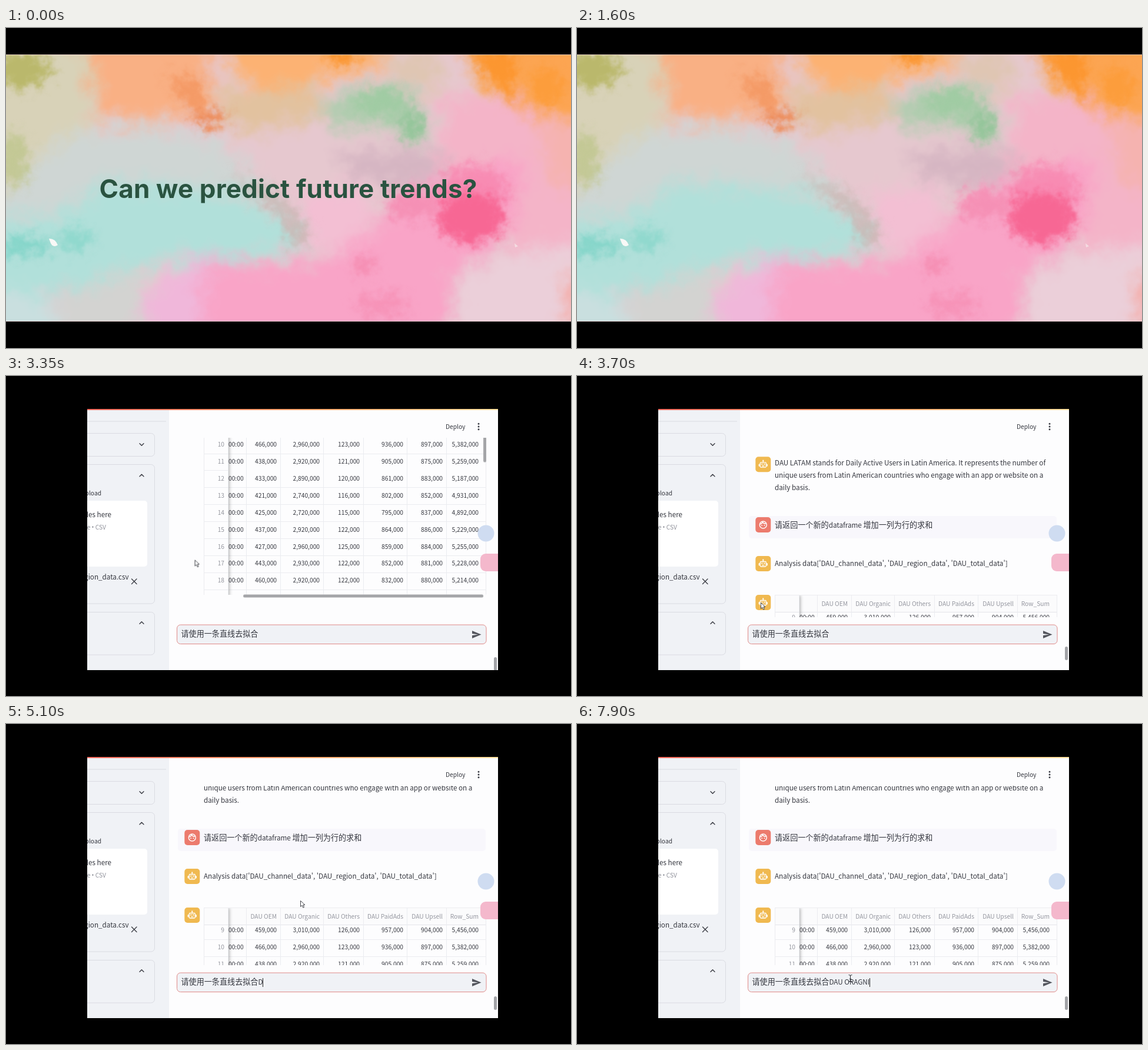
An HTML page without scripts for the animation above (8000 ms loop, 960 by 544 pixels).

```html
<!DOCTYPE html>
<html lang="zh-CN">
<head>
<meta charset="utf-8">
<title>Trend chat demo</title>
<style>
html, body { margin: 0; width: 100%; height: 100%; overflow: hidden; background: #000; }
.stage { position: relative; width: 960px; height: 544px; overflow: hidden; background: #000;
  font: 11.68px "Noto Sans CJK SC", "Noto Sans CJK", "Noto Sans", sans-serif; color: #34363e; }
.stage svg, .stage div { position: absolute; }
.stage svg { left: 0; top: 0; }
text { fill: #34363e; white-space: pre; }
.sm { font-size: 10.24px; }
.cn { font-size: 13.1px; }
.end { text-anchor: end; }
.line { fill: none; stroke: #dadbe2; }
.icon { fill: none; stroke: #3c3e46; stroke-width: 1.4; stroke-linecap: round; stroke-linejoin: round; }
.dots { stroke-width: 3; }

/* every state change is a hard cut on one 8 s clock */
.paint, .title, .screen, .chat, .bars, .thumb, .ime, .shade, .arrow, .beam, .caret, .cjk::after, .lat::after {
  animation: 8s step-end infinite; }
.paint { animation-name: paint; }
.title { animation-name: title; font: 700 44px Inter, sans-serif; letter-spacing: .15px; fill: #2a5340; text-anchor: middle; }
.screen { animation-name: screen; width: 960px; height: 544px; clip-path: inset(56px 124px 44px 138px); background: #fdfdfe; }
.view { left: 278px; top: 105px; width: 557px; height: 305px; overflow: hidden; }
.chat { animation-name: scroll; left: -278px; top: -105px; width: 960px; height: 700px; }
.bars { animation-name: bars; }
.thumb { animation-name: thumb; }
.ime { animation-name: ime; }
.shade { animation-name: shade; }
.arrow { animation-name: arrow; }
.beam { animation-name: beam; }

.table { left: 336px; top: 312px; width: 480px; height: 323px; overflow: hidden; display: flex;
  border-top: 1px solid #ececf0; box-sizing: border-box; font-size: 10.24px;
  background: repeating-linear-gradient(#0000 0 27.875px, #ebecf0 27.875px 28.875px) 0 -3.5px / 100% 400px; }
.stage .col { position: relative; flex: none; width: var(--w); height: 330px; box-sizing: border-box; padding-right: 6px;
  border-right: 1px solid #ebecf0; white-space: pre; text-align: right; line-height: 28.875px; }
.col b { display: block; position: relative; height: 28.5px; line-height: 27.5px; margin: 0 -6px -5.1px 0; padding-right: 6px;
  box-sizing: border-box; background: #fbfbfc; border-bottom: 1px solid #e4e5ea; color: #94969f; font-weight: 400; }
.stage .idx { z-index: 2; color: #92949c; border-left: 1px solid #ebecf0; background: inherit; background-color: #fdfdfe;
  background-position: 0 -3.5px; box-shadow: 2px 0 5px #0004; }
.col:last-child, .col:last-child b { padding-right: 12px; }
.col:last-child b { margin-right: -12px; }

.input { left: 297.5px; top: 428.4px; height: 20px; display: flex; align-items: baseline; white-space: pre; line-height: 20px; }
.cjk { font-size: 13.1px; }
.cjk::after { content: ""; animation-name: cjk; }
.lat::after { content: ""; animation-name: lat; }
.caret { align-self: center; width: 1px; height: 15px; margin-top: 2px; background: #222; animation-name: caret; }

@keyframes paint { 0% { opacity: 1 } 28.75%, to { opacity: 0 } }
@keyframes title { 0% { opacity: 1 } 20%, to { opacity: 0 } }
@keyframes screen { 0% { opacity: 0 } 28.75%, to { opacity: 1 } }
@keyframes scroll {
  0% { transform: translateY(-263.5px) }
  46.25% { transform: translateY(60px) }
  55% { transform: translateY(42px) }
  59.375%, to { transform: none }
}
@keyframes bars { 0% { opacity: 0 } 41.875% { opacity: 1 } 46.25%, to { opacity: 0 } }
@keyframes thumb {
  0% { opacity: 0; transform: translateY(15px) }
  37.5% { opacity: 1; transform: translateY(15px) }
  46.25% { opacity: 1; transform: translateY(-3px) }
  55% { opacity: 1; transform: translateY(-2px) }
  59.375%, to { opacity: 1; transform: none }
}
@keyframes ime { 0% { opacity: 1 } 33.125%, to { opacity: 0 } }
@keyframes shade { 0% { opacity: 1 } 37.5%, to { opacity: 0 } }
@keyframes arrow {
  0% { opacity: 1; transform: translate(393px, 443px) }
  37.5% { transform: translate(400px, 420px) }
  41.875% { transform: translate(320.5px, 312.5px) }
  46.25% { transform: translate(312px, 385px) }
  50.625% { transform: translate(470px, 309px) }
  55% { transform: translate(472px, 340px) }
  63.75% { transform: translate(500px, 300px) }
  68.125% { opacity: 1; transform: translate(462px, 320px) }
  76.875%, to { opacity: 0; transform: translate(462px, 320px) }
}
@keyframes beam { 0% { opacity: 0 } 76.875%, to { opacity: 1 } }
@keyframes caret { 0% { opacity: 1 } 37.5% { opacity: 0 } 55%, to { opacity: 1 } }
@keyframes cjk { 0% { content: "" } 33.125% { content: "去" } 37.5%, to { content: "去拟合" } }
@keyframes lat {
  0% { content: "qu" }
  33.125% { content: "" }
  63.75% { content: "D" }
  68.125% { content: "DA" }
  72.5% { content: "DAU" }
  76.875% { content: "DAUOR" }
  81.25% { content: "DAU" }
  85.625% { content: "DAU O" }
  90% { content: "DAU ORAG" }
  98.75%, to { content: "DAU ORAGNI" }
}
</style>
</head>
<body>
<div class="stage">

<svg class="paint" width="960" height="544">
  <defs>
    <filter id="wash" filterUnits="userSpaceOnUse" x="-60" y="-20" width="1080" height="600" color-interpolation-filters="sRGB">
      <feGaussianBlur in="SourceGraphic" stdDeviation="15" result="soft"/>
      <feTurbulence type="fractalNoise" baseFrequency=".035" numOctaves="4" seed="4" result="noise"/>
      <feDisplacementMap in="soft" in2="noise" scale="40" xChannelSelector="R" yChannelSelector="G"/>
    </filter>
    <filter id="spots" filterUnits="userSpaceOnUse" x="-60" y="-20" width="1080" height="600" color-interpolation-filters="sRGB">
      <feGaussianBlur in="SourceGraphic" stdDeviation="9" result="soft"/>
      <feTurbulence type="fractalNoise" baseFrequency=".06" numOctaves="3" seed="9" result="noise"/>
      <feDisplacementMap in="soft" in2="noise" scale="38" xChannelSelector="R" yChannelSelector="G"/>
    </filter>
    <clipPath id="band"><path d="M0 45H960V499H0Z"/></clipPath>
  </defs>
  <g clip-path="url(#band)">
    <path fill="#e6c8cf" d="M0 45H960V499H0Z"/>
    <g filter="url(#wash)">
      <path fill="#e6c8cf" d="M-60 -20H1020V580H-60Z"/>
      <path fill="#d8d2b8" d="M-60 -20H140L150 180L40 330H-60Z"/>
      <path fill="#cfd6d4" d="M100 180L240 165L360 190L430 260L500 360L400 400L-60 420V330Z"/>
      <path fill="#b1e0da" d="M-60 335L110 310L160 262L300 270L400 285L480 325L510 375L400 392L300 385L190 430L60 455H-60Z"/>
      <path fill="#c9dfdf" d="M-60 440L70 455L110 560H-60Z"/>
      <path fill="#d3d3d1" d="M80 460L240 400L220 560H110Z"/>
      <path fill="#f9b084" d="M125 -20H345L350 130L280 155L160 155Z"/>
      <path fill="#fcb273" d="M350 -20H640V70L540 88L450 110L390 85Z"/>
      <path fill="#e2c29f" d="M350 105L450 105L530 95L540 150L420 178L370 165Z"/>
      <path fill="#dfc6b2" d="M640 40H740L735 120L660 90Z"/>
      <path fill="#aecdae" d="M530 135L590 105L670 98L715 150L700 190L640 165L560 168Z"/>
      <path fill="#d5b5c2" d="M560 215L720 200L760 240L700 270L590 260Z"/>
      <path fill="#f4b4c8" d="M740 110L1020 130V380H860L740 240Z"/>
      <path fill="#f5b3b0" d="M900 150H1020V290L930 270Z"/>
      <path fill="#fca552" d="M775 -20H1020V150L920 150L865 120L800 95Z"/>
      <path fill="#f3bfd3" d="M490 285L600 265L630 320L590 385L520 370Z"/>
      <path fill="#f0b7da" d="M225 580L240 450L320 390L400 400V580Z"/>
      <path fill="#f9a4c7" d="M330 580L335 405L480 400L560 385L620 345L680 280L760 250L880 215L870 320L820 385L760 420L750 580Z"/>
      <path fill="#ebcfd9" d="M770 420L860 380L1020 360V580H760Z"/>
      <path fill="#f3b2b0" d="M948 420H1020V580H948Z"/>
    </g>
    <g filter="url(#spots)">
      <ellipse cx="25" cy="70" rx="50" ry="32" fill="#b5b45f" opacity=".85"/>
      <ellipse cx="14" cy="225" rx="24" ry="48" fill="#bfc68c" opacity=".8"/>
      <path fill="#f49a66" d="M270 80L330 85L345 150L300 130Z"/>
      <ellipse cx="348" cy="154" rx="29" ry="13" fill="#ee8852"/>
      <ellipse cx="570" cy="48" rx="26" ry="13" fill="#fb9227"/>
      <ellipse cx="690" cy="165" rx="18" ry="30" fill="#94c59a"/>
      <ellipse cx="635" cy="125" rx="45" ry="22" fill="#a0cba3"/>
      <path fill="#fc9630" d="M785 40H865L862 130L835 100Z"/>
      <ellipse cx="918" cy="100" rx="28" ry="34" fill="#fc9d3c"/>
      <path fill="#c9b5b1" d="M375 245L460 280L520 345L490 380L465 320Z" opacity=".75"/>
      <ellipse cx="30" cy="370" rx="48" ry="16" fill="#84d5c9"/>
      <ellipse cx="118" cy="360" rx="30" ry="18" fill="#8fd8cd"/>
      <ellipse cx="690" cy="300" rx="42" ry="26" fill="#f590b5"/>
      <ellipse cx="795" cy="275" rx="60" ry="42" fill="#f783ad" opacity=".75"/>
      <ellipse cx="790" cy="322" rx="58" ry="44" fill="#f76794"/>
      <ellipse cx="608" cy="405" rx="20" ry="16" fill="#f58db2"/>
      <ellipse cx="640" cy="470" rx="45" ry="20" fill="#f68eb3" opacity=".75"/>
    </g>
    <path fill="#f8f8f6" d="M73 358Q84 358 88 369Q80 374 76 366Z"/>
    <path fill="#f4dde2" d="M864 366L870 371L865 373Z"/>
    <path stroke="#f6d9d8" opacity=".7" d="M0 45.5H960M0 498.5H960"/>
  </g>
  <text class="title" x="479.5" y="288.5">Can we predict future trends?</text>
</svg>

<div class="screen">
  <svg width="960" height="544">
    <defs>
      <linearGradient id="top"><stop stop-color="#f4685c"/><stop offset=".55" stop-color="#fba96c"/><stop offset="1" stop-color="#fde3a0"/></linearGradient>
      <path id="down" class="icon" d="M-3.5 -1.8L0 1.8L3.5 -1.8"/>
      <path id="up" class="icon" d="M-3.5 1.8L0 -1.8L3.5 1.8"/>
    </defs>
    <path fill="#f0f2f6" d="M138 56H277V500H138Z"/>
    <path fill="url(#top)" d="M138 56H836V58H138Z"/>
    <g class="line">
      <path d="M138 77H272"/>
      <rect x="100" y="97.5" width="152.5" height="39" rx="6"/>
      <rect x="100" y="150.5" width="152.5" height="236.5" rx="6"/>
      <rect x="100" y="401.5" width="152.5" height="72.5" rx="6"/>
    </g>
    <rect x="100" y="212" width="140" height="112" rx="5" fill="#fff"/>
    <use href="#down" x="230.5" y="116.5"/>
    <use href="#up" x="230.5" y="169"/>
    <use href="#up" x="230.5" y="419.5"/>
    <path class="icon" d="M213.5 345l8.5 8.5m0 -8.5l-8.5 8.5"/>
    <g class="end">
      <text class="sm" x="162" y="203">Upload</text>
      <text x="179" y="240">Drop files here</text>
      <text class="sm" x="170" y="261" style="fill:#8f919a">per file <tspan font-family="Noto Sans, sans-serif">•</tspan> CSV</text>
      <text x="208.5" y="346">DAU_region_data.csv</text>
    </g>
    <text class="sm" x="747" y="90">Deploy</text>
    <path class="icon dots" d="M803 81.3h.01M803 86h.01M803 90.7h.01"/>
  </svg>

  <div class="view"><div class="chat">
    <svg width="960" height="700">
      <defs>
        <g id="bot">
          <rect width="26" height="26" rx="5" fill="#f0b950"/>
          <g fill="none" stroke="#fff" stroke-width="1.3">
            <rect x="8" y="9.5" width="10" height="8.5" rx="1.5"/>
            <path d="M13 9.5V6.5M8 13H6v2.5h2M18 13h2v2.5h-2M10.8 15.7h4.4"/>
          </g>
          <path fill="#fff" d="M10 11.5h2v2h-2zM14 11.5h2v2h-2zM12 5.5h2v2h-2z"/>
        </g>
      </defs>
      <rect x="292" y="178" width="523" height="38" rx="5" fill="#f8f7fc"/>
      <use href="#bot" x="303.3" y="77.3"/>
      <use href="#bot" x="303.3" y="246"/>
      <use href="#bot" x="303.3" y="312"/>
      <g transform="translate(303.3 180)">
        <rect width="26" height="26" rx="5" fill="#ec7b6d"/>
        <circle cx="13" cy="13" r="6" fill="none" stroke="#fff" stroke-width="1.4"/>
        <path fill="none" stroke="#fff" stroke-width="1.4" d="M7.5 12Q11 11.5 12 8.5Q14 11.5 18.5 11"/>
        <path fill="#fff" d="M10 13.3h1.6v1.6h-1.6zM14.4 13.3h1.6v1.6h-1.6z"/>
      </g>
      <text x="336" y="92">DAU LATAM stands for Daily Active Users in Latin America. It represents the number of</text>
      <text x="336" y="113">unique users from Latin American countries who engage with an app or website on a</text>
      <text x="336" y="134">daily basis.</text>
      <text class="cn" x="336" y="198">请返回一个新的<tspan font-size="11.68">dataframe </tspan>增加一列为行的求和</text>
      <text x="336" y="263">Analysis data['DAU_channel_data', 'DAU_region_data', 'DAU_total_data']</text>
    </svg>
    <div class="table">
      <div class="col idx" style="--w:42px"><b> </b>9
10
11
12
13
14
15
16
17
18</div>
      <div class="col" style="--w:31px"><b> </b>00:00
00:00
00:00
00:00
00:00
00:00
00:00
00:00
00:00
00:00</div>
      <div class="col" style="--w:58px"><b>DAU OEM</b>459,000
466,000
438,000
433,000
421,000
425,000
437,000
427,000
443,000
460,000</div>
      <div class="col" style="--w:73px"><b>DAU Organic</b>3,010,000
2,960,000
2,920,000
2,890,000
2,740,000
2,720,000
2,920,000
2,960,000
2,930,000
2,920,000</div>
      <div class="col" style="--w:68px"><b>DAU Others</b>126,000
123,000
121,000
120,000
116,000
115,000
122,000
125,000
122,000
122,000</div>
      <div class="col" style="--w:74px"><b>DAU PaidAds</b>957,000
936,000
905,000
861,000
802,000
795,000
864,000
859,000
852,000
832,000</div>
      <div class="col" style="--w:67px"><b>DAU Upsell</b>904,000
897,000
875,000
883,000
852,000
837,000
886,000
884,000
881,000
880,000</div>
      <div class="col" style="--w:67px"><b>Row_Sum</b>5,456,000
5,382,000
5,259,000
5,187,000
4,931,000
4,892,000
5,229,000
5,255,000
5,228,000
5,214,000</div>
    </div>
    <svg class="bars" width="960" height="700" fill="#a4a5a8">
      <rect x="403" y="635" width="408" height="5" rx="2.5"/>
      <rect x="811" y="362" width="5" height="48" rx="2.5"/>
    </svg>
  </div></div>

  <svg width="960" height="544">
    <defs>
      <linearGradient id="fade" x2="0" y2="1"><stop stop-color="#c8c8cc" stop-opacity="0"/><stop offset="1" stop-color="#c8c8cc" stop-opacity=".75"/></linearGradient>
    </defs>
    <path class="shade" fill="url(#fade)" d="M138 460H836V500H138Z"/>
    <rect x="290.5" y="423" width="525.5" height="32.5" rx="6" fill="#f0f2f6" stroke="#e08a88"/>
    <path fill="#54565e" d="M792 433L807.5 439.5L792 446V441L802 439.5L792 438Z"/>
    <rect class="thumb" x="829" y="463" width="5" height="23" rx="2.5" fill="#a2a3a7"/>
    <circle cx="815.5" cy="267.5" r="14" fill="#cfdcf1"/>
    <rect x="806" y="302" width="40" height="30" rx="9" fill="#f4b8cc"/>
  </svg>

  <div class="input"><span class="cjk">请使用一条直线</span><span class="lat"></span><span class="caret"></span></div>

  <svg width="960" height="544">
    <g class="ime">
      <rect x="390" y="451" width="378" height="21" rx="5" fill="#0002"/>
      <rect x="389" y="449" width="378" height="21" rx="5" fill="#f9f9fb"/>
      <path fill="#eeeff3" d="M396 450H433V469H396Z"/>
      <path fill="#1f5fae" d="M392 453h2v12h-2z"/>
      <g font-size="9.8">
        <text x="399" y="463">1 去</text><text x="442" y="463">2 取</text><text x="485.5" y="463">3 区</text>
        <text x="528.5" y="463">4 曲</text><text x="571.5" y="463">5 娶</text><text x="615" y="463">6 屈</text><text x="658" y="463">7 渠</text>
      </g>
      <path fill="#a5a6aa" d="M706.5 456.5v5l-4.5 -2.5z"/>
      <path fill="#222" d="M718 456v6l4.5 -3z"/>
      <path class="icon" d="M739 454.5h-4v8.5h8.5v-4M754 457.5l3.5 3.5l3.5 -3.5"/>
      <path fill="#222" d="M742 460l-3 -3q-1 -3 1.5 -3l1.5 1l1.5 -1q2.5 0 1.5 3z"/>
    </g>
    <path class="arrow" fill="#fff" stroke="#44464c" d="M.5 .5V10.5L3 8.3L4.8 12.2L6.6 11.4L4.8 7.6H8Z"/>
    <path class="beam" fill="none" stroke="#33353b" stroke-width="1.1" d="M461.5 426.5q2.5 0 3 1.5q.5 -1.5 3 -1.5M464.5 428V436.5M461.5 438q2.5 0 3 -1.5q.5 1.5 3 1.5M462.8 433.5h3.4"/>
  </svg>
</div>

</div>
</body>
</html>
```
